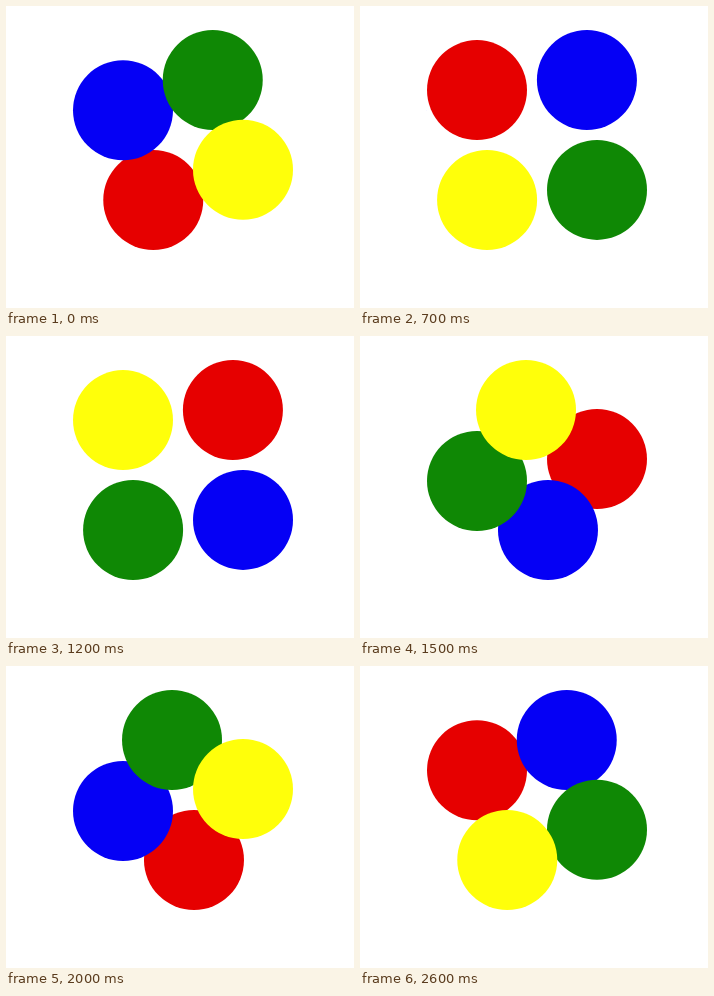
These frames come from a looping animation (348 by 302 pixels, 2.7 s). An HTML page:

```html
<!DOCTYPE html>
<html lang="en">
<head>
<meta charset="utf-8">
<title>Circling dots</title>
<style>
html, body { margin: 0; width: 100%; height: 100%; overflow: hidden; background: #fff; }
svg { display: block; width: 348px; height: 302px; }
</style>
</head>
<body>
<svg id="stage" viewBox="0 0 348 302"></svg>
<script>
const LOOP = 2700, STEP = 100, SIDE_TIME = 500;
const LEFT = 117, TOP = 74, SIDE = 120, RADIUS = 50;

// Bottom to top; side is the edge of the square where the dot starts
// (0 top, 1 right, 2 bottom, 3 left).
const dots = [
  { color: '#e60000', side: 2 },
  { color: '#0500f5', side: 3 },
  { color: '#0f8805', side: 0 },
  { color: '#ffff0a', side: 1 }
];

const stage = document.getElementById('stage');
for (const dot of dots) {
  dot.el = document.createElementNS('http://www.w3.org/2000/svg', 'circle');
  dot.el.setAttribute('r', RADIUS);
  dot.el.setAttribute('fill', dot.color);
  stage.appendChild(dot.el);
}

// cubic-bezier(.25, .1, .25, 1)
function ease(x) {
  let lo = 0, hi = 1, u = 0.5;
  for (let i = 0; i < 30; i++) {
    u = (lo + hi) / 2;
    if (0.75 * u * (1 - u) + u ** 3 < x) lo = u; else hi = u;
  }
  return 0.3 * u * (1 - u) ** 2 + 3 * u * u * (1 - u) + u ** 3;
}

// Clockwise along the square
function place(side, d) {
  const far = SIDE - d;
  const [x, y] = [[d, 0], [SIDE, d], [far, SIDE], [0, far]][side % 4];
  return [LEFT + x, TOP + y];
}

function draw(ms) {
  const t = Math.floor((ms % LOOP) / STEP) * STEP;
  // The dots rest for one step before they set off
  const phase = 0.45 + Math.max(0, t - STEP) / SIDE_TIME;
  const turns = Math.floor(phase);
  const d = SIDE * ease(phase - turns);
  for (const dot of dots) {
    const [x, y] = place(dot.side + turns, d);
    dot.el.setAttribute('cx', x.toFixed(2));
    dot.el.setAttribute('cy', y.toFixed(2));
  }
}

const start = performance.now();
function tick() {
  draw(performance.now() - start);
  requestAnimationFrame(tick);
}
tick();
</script>
</body>
</html>
```
